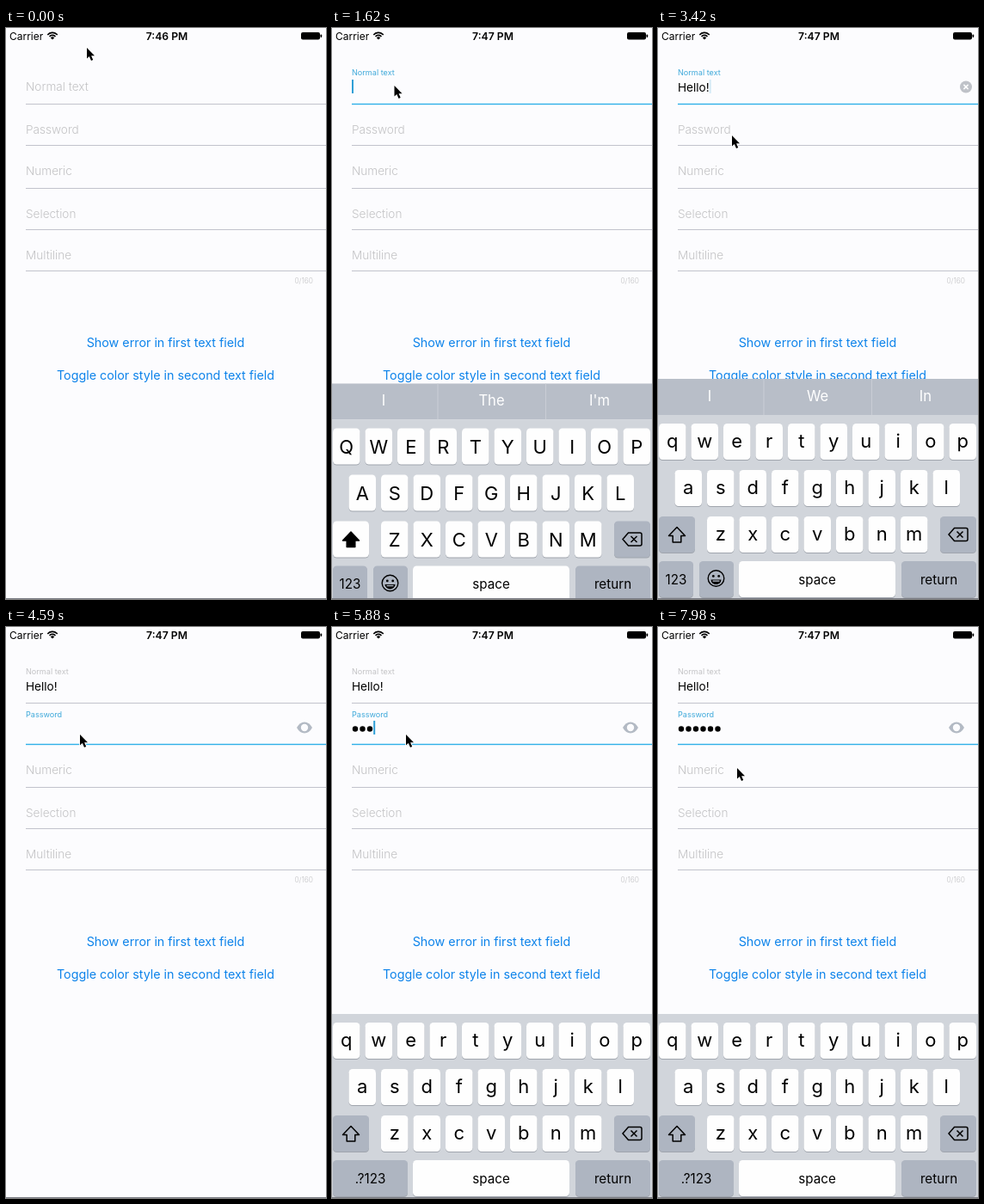
Write an HTML page with a canvas that moves like this. It is 372 px wide and 664 px high and loops after 8000 ms.

```html
<!DOCTYPE html>
<html lang="en">
<head>
<meta charset="utf-8">
<title>Animated text fields</title>
<style>
  html, body { margin: 0; width: 372px; height: 664px; overflow: hidden; background: #fcfcfe; }
  canvas { display: block; width: 372px; height: 664px; }
</style>
</head>
<body>
<canvas id="stage"></canvas>
<script>
const W = 372, H = 664, LOOP = 8000;
const canvas = document.getElementById('stage');
const ctx = canvas.getContext('2d');
const ratio = window.devicePixelRatio || 1;
canvas.width = W * ratio;
canvas.height = H * ratio;

const C = {
  page: '#fcfcfe', ink: '#000', hint: '#c3c3c5', rule: '#c2c3cc', blue: '#0d83ea',
  label: '#3fa9da', active: '#2fb0e8', caret: '#2f9fd6', clear: '#bfc2c8',
  eye: '#b3bac4', eyePressed: '#999ea6',
  board: '#d1d5db', bar: '#b8bec8', divider: '#c9cdd5', key: '#fefefe', darkKey: '#aeb5c1',
  shadow: '#a0a5ad'
};

const FIELDS = [
  { name: 'Normal text', base: 72.5, line: 88, focus: 1200, blur: 3930 },
  { name: 'Password', base: 122.5, line: 136, focus: 3930, blur: Infinity },
  { name: 'Numeric', base: 170.5, line: 186 },
  { name: 'Selection', base: 220.5, line: 234 },
  { name: 'Multiline', base: 268.5, line: 282 }
];

const GREETING = 'Hello!';
const GREETING_KEYS = [2050, 2200, 2360, 2500, 2660, 2900];
const SECRET_KEYS = [5400, 5580, 5760, 5940, 6120, 6300];

// Pointer stops: time, x, y
const POINTER = [
  [0, 94, 23], [200, 94, 23], [1050, 72.5, 67], [3000, 72.5, 67], [3390, 86, 125],
  [6250, 86, 125], [6660, 346, 121], [7100, 346, 121], [7800, 92, 164], [8000, 92, 164]
];

const clamp = v => Math.max(0, Math.min(1, v));
const ease = v => { v = clamp(v); return v * v * (3 - 2 * v); };
const mix = (a, b, p) => a + (b - a) * p;
const typed = (times, t) => times.filter(k => k <= t).length;

// Critically damped spring, 0 to 1
function spring(t, start) {
  if (t <= start) return 0;
  const x = (t - start) * 0.0185;
  return 1 - (1 + x) * Math.exp(-x);
}

function text(str, x, y, size, color, align = 'left', weight = 400) {
  ctx.font = `${weight} ${size}px Inter, sans-serif`;
  ctx.textAlign = align;
  ctx.fillStyle = color;
  ctx.fillText(str, x, y);
}

function rect(x, y, w, h, color) {
  ctx.fillStyle = color;
  ctx.fillRect(x, y, w, h);
}

function rounded(x, y, w, h, r, color) {
  ctx.beginPath();
  ctx.roundRect(x, y, w, h, r);
  ctx.fillStyle = color;
  ctx.fill();
}

function disc(x, y, r, color) {
  ctx.beginPath();
  ctx.arc(x, y, r, 0, 7);
  ctx.fillStyle = color;
  ctx.fill();
}

function fill(path, color) {
  ctx.fillStyle = color;
  ctx.fill(new Path2D(path));
}

function stroke(path, color, width) {
  ctx.strokeStyle = color;
  ctx.lineWidth = width;
  ctx.stroke(new Path2D(path));
}

function at(x, y, draw) {
  ctx.save();
  ctx.translate(x, y);
  draw();
  ctx.restore();
}

function statusBar(t) {
  text('Carrier', 4, 13.5, 12, C.ink);
  at(54, 13, () => {
    for (const r of [4.6, 7.6]) {
      ctx.beginPath();
      ctx.arc(0, 0, r, -Math.PI * 0.77, -Math.PI * 0.23);
      ctx.strokeStyle = C.ink;
      ctx.lineWidth = 1.6;
      ctx.stroke();
    }
    fill('M0 .5-2.2-1.5A3 3 0 0 1 2.2-1.5Z', C.ink);
  });
  text(t < 1000 ? '7:46 PM' : '7:47 PM', 187, 13.5, 12.2, C.ink, 'center', 600);
  rounded(343, 5, 22, 8.5, 2, C.ink);
  rounded(365.5, 7.5, 1.7, 3.5, 0.8, C.ink);
}

function caret(x, y, t, since) {
  const phase = (t - since) % 1000;
  ctx.globalAlpha = clamp((540 - phase) / 100) + clamp((phase - 920) / 80);
  rect(x, y, 2, 16, C.caret);
  ctx.globalAlpha = 1;
}

function field({ name, base, line, focus = Infinity, blur = Infinity }, t) {
  const float = ease((t - focus) / 300);
  const isActive = t >= focus && t < blur;
  text(name, 23, base - 17.5 * float, mix(13.6, 9.1, float),
    isActive ? C.label : C.hint, 'left', float > 0.5 ? 400 : 300);
  rect(23, line, W - 23, 1, C.rule);
  const lit = ease((t - focus) / 300) - ease((t - blur) / 300);
  if (lit > 0) rect(23, line - 0.2, (W - 23) * lit, 1.4, C.active);
}

function greeting(t) {
  const count = typed(GREETING_KEYS, t), value = GREETING.slice(0, count);
  text(value, 23, 73.5, 13.6, C.ink);
  if (t < 1300 || t >= FIELDS[0].blur) return;
  const end = 23 + ctx.measureText(value).width;
  caret(end, 60, t, count ? GREETING_KEYS[count - 1] : 1300);
  if (count) {
    disc(358, 68.5, 7, C.clear);
    at(358, 68.5, () => stroke('M-2.6-2.6 2.6 2.6M2.6-2.6-2.6 2.6', '#fff', 1.5));
  }
}

function secret(t) {
  if (t < FIELDS[1].focus) return;
  const count = typed(SECRET_KEYS, t);
  for (let i = 0; i < count; i++) disc(27 + i * 8.5, 118.5, 3.2, C.ink);
  if (t >= 4600) caret(23 + count * 8.4, 109, t, count ? SECRET_KEYS[count - 1] : 4600);
  const pressed = t > 6680 && t < 6850;
  at(347, 117, () => {
    fill('M-9 0Q-5.5-6.5 0-6.5T9 0Q5.5 6.5 0 6.5T-9 0Z', pressed ? C.eyePressed : C.eye);
    disc(0, 0, 4.2, C.page);
  });
}

function key(x, y, w, color, label, size, drop) {
  rounded(x, y + 1, w, 42, 4.5, C.shadow);
  rounded(x, y, w, 42, 4.5, color);
  if (label) text(label, x + w / 2, y + drop, size, C.ink, 'center');
}

function smiley(x, y) {
  at(x, y, () => {
    ctx.beginPath();
    ctx.arc(0, 0, 9.3, 0, 7);
    ctx.strokeStyle = C.ink;
    ctx.lineWidth = 1.4;
    ctx.stroke();
    disc(-3.2, -2.6, 1.4, C.ink);
    disc(3.2, -2.6, 1.4, C.ink);
    fill('M-6 1.5H6A6 5.5 0 0 1-6 1.5Z', C.ink);
    rect(-4, 2.4, 8, 1.4, C.darkKey);
  });
}

function keyboard(offset, { upper, words }) {
  at(0, offset, () => {
    if (words) {
      rect(0, 408, W, 42, C.bar);
      rect(122.5, 408, 1, 42, C.divider);
      rect(248, 408, 1, 42, C.divider);
      words.forEach((word, i) => text(word, 60 + i * 125.5, 433.5, 16.6, '#fff', 'center'));
    }
    rect(0, 450, W, H - 450, C.board);

    ['qwertyuiop', 'asdfghjkl', 'zxcvbnm'].forEach((row, r) => {
      const left = [1, 19.5, 57][r];
      [...row].forEach((ch, i) => key(left + i * 37.5, 460 + r * 54, 31.5, C.key,
        upper ? ch.toUpperCase() : ch, 22, upper ? 29.5 : 28));
    });

    key(1, 568, 42, upper ? C.key : C.darkKey);
    at(22, 589.5, () => {
      const arrow = 'M0-9 9.5 1H4.8V8.5H-4.8V1H-9.5Z';
      ctx.lineJoin = 'round';
      stroke(arrow, C.ink, 1.5);
      if (upper) fill(arrow, C.ink);
    });

    key(328, 568, 42, C.darkKey);
    at(349, 589, () => stroke(
      'M-11 0-4.5-7.5H9Q11-7.5 11-5.5V5.5Q11 7.5 9 7.5H-4.5ZM-1.5-3.5 5.5 3.5M5.5-3.5-1.5 3.5',
      C.ink, 1.5));

    if (words) {
      key(1, 620, 40, C.darkKey, '123', 15.2, 27);
      key(48, 620, 40, C.darkKey);
      smiley(67.5, 640);
    } else {
      key(1, 620, 87, C.darkKey, '.?123', 15.2, 27);
    }
    key(94, 620, 182, C.key, 'space', 15.2, 26.5);
    key(283, 620, 87, C.darkKey, 'return', 15.2, 26.5);
  });
}

function keyboards(t) {
  if (t > 1310 && t < 4590) {
    const count = typed(GREETING_KEYS, t);
    keyboard(256 * (1 - spring(t, 1310) + spring(t, FIELDS[0].blur)), {
      upper: count === 0,
      words: count < GREETING.length ? ['I', 'The', "I'm"] : ['I', 'We', 'In']
    });
  } else if (t > 4590) {
    keyboard(214 * (1 - spring(t, 4591)), { upper: false });
  }
}

function pointer(t) {
  const next = Math.max(1, POINTER.findIndex(stop => stop[0] > t));
  const [t0, x0, y0] = POINTER[next - 1], [t1, x1, y1] = POINTER[next];
  const p = ease((t - t0) / (t1 - t0));
  at(mix(x0, x1, p), mix(y0, y1, p), () => {
    const arrow = 'M0 0V12.6L2.8 10.1 5 15 7.2 14 5.1 9.2H9Z';
    ctx.lineJoin = 'round';
    stroke(arrow, '#fff', 1.8);
    fill(arrow, C.ink);
  });
}

function frame() {
  const t = performance.now() % LOOP;
  ctx.setTransform(ratio, 0, 0, ratio, 0, 0);
  rect(0, 0, W, H, C.page);
  statusBar(t);
  FIELDS.forEach(f => field(f, t));
  greeting(t);
  secret(t);
  text('0/160', 357, 296.5, 8.4, C.hint, 'right', 300);
  text('Show error in first text field', 185.5, 370.5, 14.3, C.blue, 'center');
  text('Toggle color style in second text field', 185.5, 408.5, 14.3, C.blue, 'center');
  keyboards(t);
  rect(0, 663, W, 1, '#7c7e86');
  pointer(t);
  requestAnimationFrame(frame);
}
frame();
</script>
</body>
</html>
```
